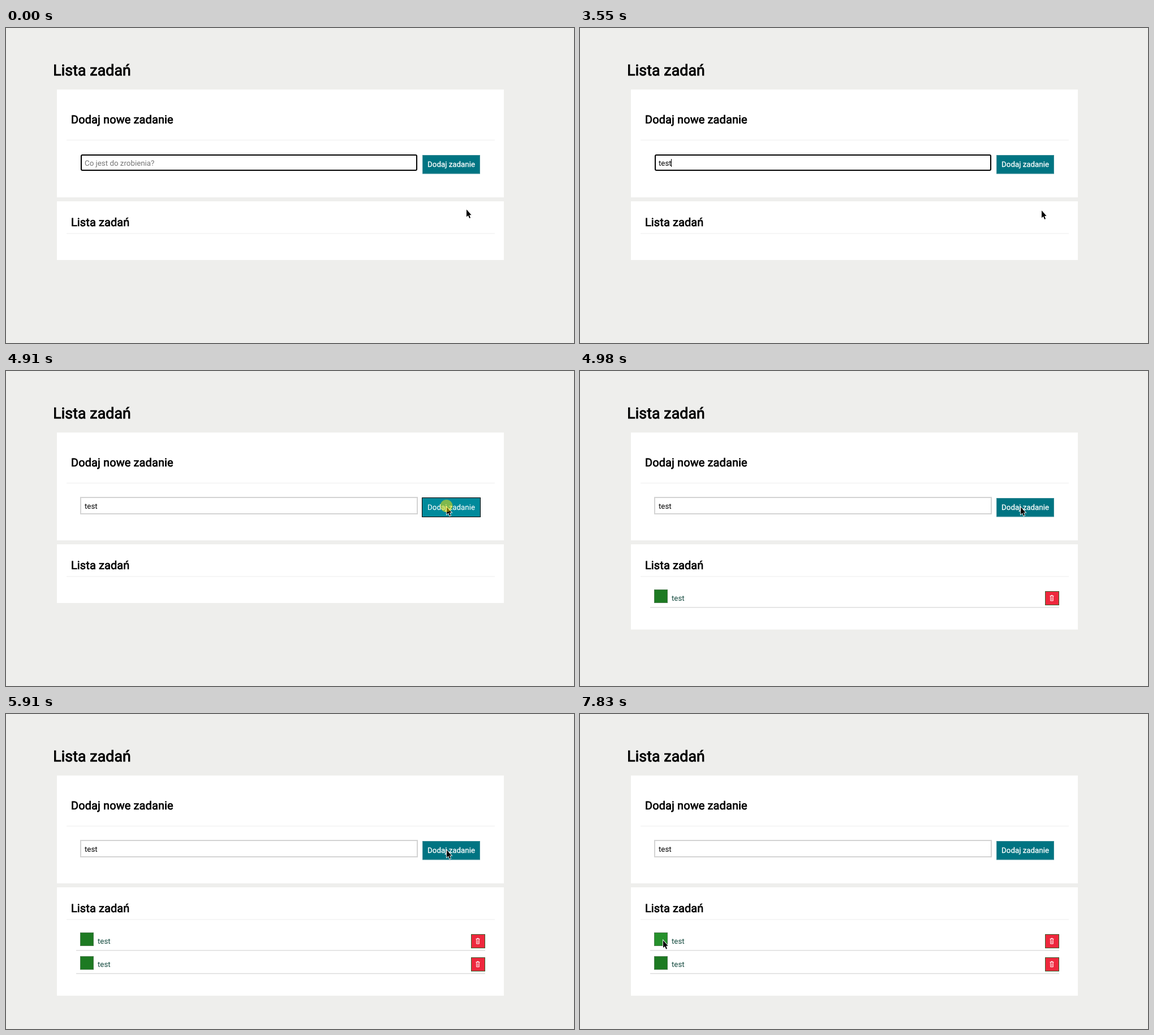
These frames come from a looping animation (1004 px wide and 558 px high, 8000 ms). An HTML page:

```html
<!DOCTYPE html>
<html lang="pl">
<head>
<meta charset="utf-8">
<title>Lista zadań</title>
<style>
  html, body { margin: 0; width: 100%; height: 100%; overflow: hidden; background: #eeeeec; }
  svg { display: block; width: 1004px; height: 558px; }
  text { font: 13.333px Roboto, Arial, sans-serif; text-rendering: geometricPrecision; white-space: pre; }
  .h1, .h2 { stroke: #000; letter-spacing: .1px; }
  .h1 { font-size: 26.667px; stroke-width: .9px; }
  .h2 { font-size: 20px; stroke-width: .72px; }
  .panel { fill: #fff; }
  .rule { fill: #eee; }
</style>
</head>
<body>
<svg viewBox="0 0 1004 558">
  <text class="h1" x="83.3" y="84">Lista zadań</text>
  <rect class="panel" x="90" y="109" width="790" height="191"/>
  <text class="h2" x="115" y="169">Dodaj nowe zadanie</text>
  <rect class="rule" x="107" y="198" width="757" height="1"/>

  <rect id="field" fill="#fff" stroke-width="2"/>
  <text id="entry" x="139" y="244"></text>
  <rect id="caret" y="232" width="1" height="14"/>

  <rect id="button"/>
  <text id="label" x="787" y="245.5" text-anchor="middle" fill="#fff" stroke="#fff">Dodaj zadanie</text>

  <rect id="list" class="panel" x="90" y="307" width="790"/>
  <text class="h2" x="115" y="351">Lista zadań</text>
  <rect class="rule" x="107" y="363.5" width="757" height="1"/>
  <g id="rows"></g>

  <path id="cursor" d="M0 0V13L3 10.4L5.1 15.6L7 14.8L5 9.7H8.6Z"
        stroke="#fff" stroke-width="1.7" paint-order="stroke"/>
  <circle id="click" cx="778.5" cy="239" r="11" fill="#ffe600" fill-opacity=".5"/>
</svg>
<script>
const LOOP = 8000, TICK = 68.7, BLINK = 532;
const $ = id => document.getElementById(id);
const set = (el, attrs) => { for (const k in attrs) el.setAttribute(k, attrs[k]); };
const show = (el, on) => set(el, { visibility: on ? 'visible' : 'hidden' });
const within = (v, a, b) => v >= a && v < b;
const box = (x, y, width, height) => ({ x, y, width, height });
const mix = (a, b, u) => a + (b - a) * u;

const linear = u => u;
const smooth = u => u * u * (3 - 2 * u);
const speedUp = u => u ** 1.37;
const slowDown = u => 1 - (1 - u) ** 2;

// Each move leads from where the last one ended; easeY defaults to easeX.
const moves = [
  { from: 720, to: 1060, x: 816, y: 323.3, easeX: linear },
  { from: 3820, to: 4430, x: 779, y: 241, easeX: smooth },
  { from: 5910, to: 6170, x: 780.5, y: 241.5, easeX: slowDown },
  { from: 6510, to: 7260, x: 286, y: 396, easeX: speedUp, easeY: u => speedUp(u) ** .62 },
  { from: 7270, to: 7815, x: 147, y: 401, easeX: slowDown, easeY: u => u + 1.5 * Math.sin(Math.PI * u) },
];

function cursorAt(t) {
  let x = 814, y = 321.5;
  for (const m of moves) {
    if (t < m.from) break;
    const elapsed = Math.floor((t - m.from) / TICK) * TICK;
    const u = Math.min(1, elapsed / (m.to - m.from));
    x = mix(x, m.x, m.easeX(u));
    y = mix(y, m.y, (m.easeY || m.easeX)(u));
  }
  return [x, y];
}

const WORD = 'test', BLUR = 4840;
const keyTimes = [...WORD].map((_, i) => 2140 + 70 * i + 130 * (i >> 1));
const pressed = t => within(t, BLUR, 4980) || within(t, 5510, 5710);

const rows = [0, 1].map(i => {
  const g = document.createElementNS('http://www.w3.org/2000/svg', 'g');
  g.innerHTML = `
    <rect class="done" x="131.5" y="${387.5 + i}" width="23" height="23" stroke="#4d7d50"/>
    <text x="162" y="406.5" fill="#12483d">${WORD}</text>
    <rect x="822.5" y="390.5" width="24" height="24" fill="#ee283d" stroke="#35602c"/>
    <path d="M830.5 398.5H837.5M832.5 397.3H835.5M831.7 399V407H836.3V399M834 400.5V406"
          fill="none" stroke="#fff"/>
    <rect x="124" y="418" width="723" height="1.5" fill="#ddd"/>`;
  set(g, { transform: `translate(0 ${41 * i})` });
  $('rows').append(g);
  return g;
});

function drawField(t) {
  const focused = t < BLUR;
  set($('field'), focused
    ? { ...box(133, 225, 593, 27), rx: 2, stroke: '#000' }
    : { ...box(132, 224, 595, 29), rx: 0, stroke: '#d3d3d3' });

  const keys = keyTimes.filter(k => k <= t);
  const typing = keys.length > 0;
  $('entry').textContent = typing ? WORD.slice(0, keys.length) : 'Co jest do zrobienia?';
  set($('entry'), { fill: typing ? '#000' : '#757575' });

  // The caret lights up again at every key press.
  const lit = typing ? keys[keys.length - 1] : 190;
  const width = typing ? $('entry').getComputedTextLength() : 0;
  set($('caret'), { x: Math.floor(138.4 + width) });
  show($('caret'), focused && t >= lit && Math.floor((t - lit) / BLINK) % 2 === 0);
}

function drawButton(t) {
  const down = pressed(t);
  set($('button'), down
    ? { ...box(735.5, 224.5, 103, 34), fill: '#008a9b', stroke: '#000' }
    : { ...box(736.5, 225.5, 101, 32.5), fill: '#007482', stroke: '#3c8f99' });
  set($('label'), { 'stroke-width': down ? .1 : .3 });
  show($('click'), down);
}

function drawList(t, x, y) {
  const count = (t >= 4980) + (t >= 5710);
  set($('list'), { height: 104 + (count && 6 + 41 * count) });
  rows.forEach((row, i) => {
    show(row, i < count);
    const top = 387 + 42 * i;
    const hover = within(x, 131, 155) && within(y, top, top + 24);
    set(row.querySelector('.done'), { fill: hover ? '#25912b' : '#1d7a22' });
  });
}

function draw(t) {
  const [x, y] = cursorAt(t);
  drawField(t);
  drawButton(t);
  drawList(t, x, y);
  set($('cursor'), { transform: `translate(${x} ${y})` });
}

const begin = performance.now();
function frame() {
  draw((performance.now() - begin) % LOOP);
  requestAnimationFrame(frame);
}
frame();
</script>
</body>
</html>
```
